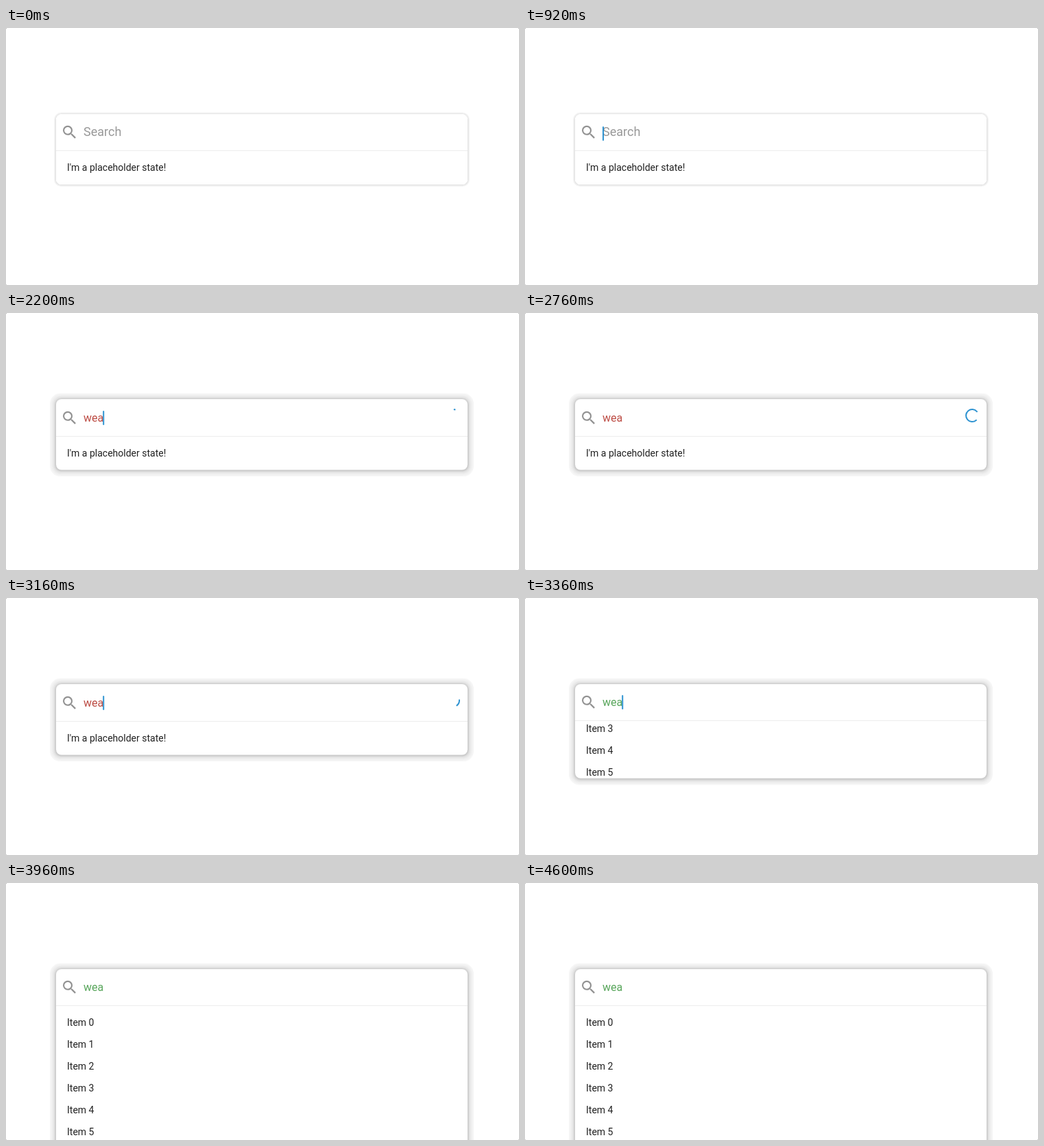
These frames come from a looping animation (748x376 px, 4680 ms). An HTML page:

```html
<!DOCTYPE html>
<html lang="en">
<head>
<meta charset="utf-8">
<title>Search field</title>
<style>
  html, body { margin: 0; width: 100%; height: 100%; overflow: hidden; background: #808080; }
  svg { display: block; font-family: Roboto, sans-serif; }
  text { fill: #212121; font-size: 14px; }
  #query { font-size: 16px; }
</style>
</head>
<body>
<svg width="748" height="376" viewBox="0 0 748 376">
  <defs>
    <clipPath id="listClip"><rect id="listArea" x="73" y="176.5" width="600"/></clipPath>
  </defs>
  <rect width="748" height="376" rx="1.5" fill="#fff"/>
  <g id="shadow"></g>
  <rect id="card" x="73" y="126" width="600" rx="8" fill="#fff"/>
  <g id="header">
    <path transform="translate(79.75 139.5) scale(1.083)" fill="#929292" d="M15.5 14h-.79l-.28-.27A6.47 6.47 0 0 0 16 9.5 6.5 6.5 0 1 0 9.5 16c1.61 0 3.09-.59 4.23-1.57l.27.28v.79l5 4.99L20.49 19l-4.99-5zm-6 0C7.01 14 5 11.99 5 9.5S7.01 5 9.5 5 14 7.01 14 9.5 11.99 14 9.5 14z"/>
    <text id="query" x="113" y="158"></text>
    <rect id="cursor" width="2" height="21" rx="1" fill="#2e93d1"/>
    <path d="M73 179.5H673" stroke="#ededed"/>
    <text id="empty" x="89" y="209">I'm a placeholder state!</text>
  </g>
  <g clip-path="url(#listClip)"><g id="list"></g></g>
  <path id="spinner" fill="none" stroke="#2e93d1" stroke-width="2" stroke-linecap="square"/>
</svg>
<script>
const LOOP = 4680, FOCUS = 920, LOADING = 2200, LOADED = 3320;
const LIST_TOP = 180, EMPTY_H = 49, LIST_H = 301;
const $ = id => document.getElementById(id);
const clamp = v => Math.min(1, Math.max(0, v));

function add(parent, tag, attrs) {
  const el = document.createElementNS('http://www.w3.org/2000/svg', tag);
  parent.append(el);
  return set(el, attrs);
}
function set(el, attrs) {
  for (const k in attrs) el.setAttribute(k, attrs[k]);
  return el;
}

// cubic-bezier(.4, 0, .2, 1)
function ease(x) {
  if (x <= 0 || x >= 1) return clamp(x);
  let lo = 0, hi = 1, s;
  for (let i = 0; i < 24; i++) {
    s = (lo + hi) / 2;
    const bx = 1.2 * (1 - s) ** 2 * s + 0.6 * (1 - s) * s * s + s ** 3;
    if (bx < x) lo = s; else hi = s;
  }
  return 3 * (1 - s) * s * s + s ** 3;
}

// Shadow rings: [spread, grey level]
const LOW = [[3, 243], [2, 238], [1, 226]];
const HIGH = [[9, 246], [7.5, 242], [6, 238], [4.5, 231], [3, 222], [2, 213], [1, 203]];
const rings = HIGH.map(() => add($('shadow'), 'rect', {}));

for (let i = 0; i < 9; i++) {
  add($('list'), 'text', { x: 89, y: 209 + 32 * i }).textContent = 'Item ' + i;
}

function drawCard(bottom, levels) {
  set($('card'), { height: bottom - 126 });
  rings.forEach((ring, i) => {
    const [s, g] = levels[i] || [0, 255];
    set(ring, {
      x: 73 - s, y: 126.6 - s, width: 600 + 2 * s, height: bottom - 126 + 2 * s,
      rx: 8 + s * 0.8, fill: `rgb(${g},${g},${g})`
    });
  });
}

function drawSpinner(t) {
  const p = t / 1333 % 1, turn = Math.PI * 2;
  const head = ease(p * 2) * 0.75, tail = ease(p * 2 - 1) * 0.75;
  const start = (tail + t / 2222 + p / 4 - 0.25) * turn;
  const end = start + Math.max(head - tail, 0.001) * turn;
  const at = a => `${652 + 9 * Math.cos(a)} ${150 + 9 * Math.sin(a)}`;
  set($('spinner'), { d: `M${at(start)}A9 9 0 ${head - tail > 0.5 ? 1 : 0} 1 ${at(end)}` });
}

function cursorAlpha(t) {
  let alpha = t >= FOCUS ? 1 : 0;
  [2460, 2960, 3480, 3960, 4400].forEach((start, i) => {
    const k = clamp((t - start) / 200);
    alpha += (i % 2 - alpha) * k;
  });
  return alpha;
}

function draw(t) {
  const loading = t >= LOADING && t < LOADED, loaded = t >= LOADED;
  const typed = t < 1280 ? '' : t < 1400 ? 'w' : t < 1960 ? 'we' : 'wea';
  const nudge = loading ? 1 : 0;

  const query = $('query');
  query.textContent = typed || 'Search';
  query.style.fontSize = typed ? '16px' : '18px';
  query.style.fill = !typed ? '#999' : loaded ? '#57a55a' : '#bc4b43';
  set($('cursor'), {
    x: typed ? 112 + query.getComputedTextLength() : 113,
    y: typed ? 142 : 144,
    opacity: cursorAlpha(t)
  });
  set($('header'), { transform: `translate(0 ${nudge})` });

  const grow = loaded ? ease((t - 3280) / 400) : 0;
  const height = EMPTY_H + (LIST_H - EMPTY_H) * grow;
  const bottom = LIST_TOP + height + nudge - (loaded ? 0 : 0.5);
  drawCard(bottom, t < LOADING ? LOW : HIGH);
  set($('listArea'), { height: bottom - 176.5 });
  set($('list'), { transform: `translate(0 ${(height - LIST_H) / 2})` });

  $('empty').style.display = loaded ? 'none' : '';
  $('list').style.display = loaded ? '' : 'none';
  $('spinner').style.display = loading ? '' : 'none';
  if (loading) drawSpinner(t - LOADING + 50);
}

const began = performance.now();
function tick() {
  draw((performance.now() - began) % LOOP);
  requestAnimationFrame(tick);
}
tick();
</script>
</body>
</html>
```
